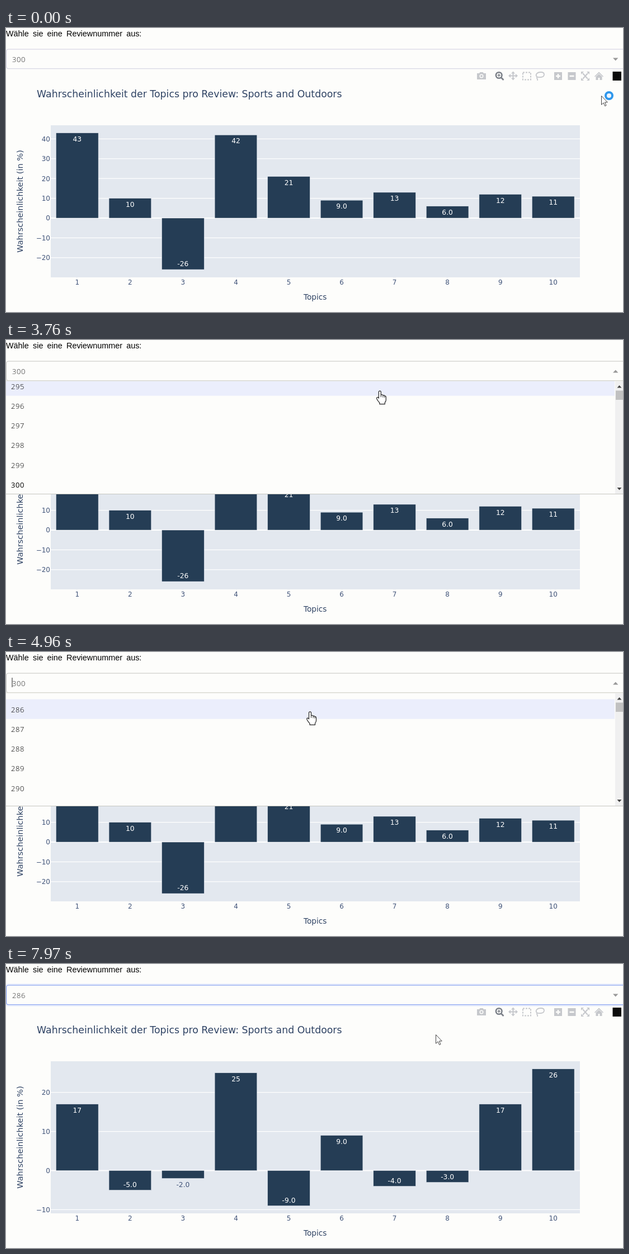
Animation of 1103x508 px, one loop 8000 ms. Source, as an HTML page with a canvas:

```html
<!DOCTYPE html>
<html lang="de">
<head>
<meta charset="utf-8">
<title>Topics pro Review</title>
<style>
html, body { margin: 0; width: 100%; height: 100%; overflow: hidden; background: #fdfdfb; }
canvas { display: block; }
</style>
</head>
<body>
<canvas id="stage" width="1103" height="508"></canvas>
<script>
const ctx = document.getElementById('stage').getContext('2d');
const LOOP = 8000, PAGE = '#fdfdfb', PLOT = '#e3e8ef', INK = '#2f4364', TICK = '#42557a', BAR = '#253d55';
const SANS = '"DejaVu Sans", sans-serif', LIST = '"Open Sans", sans-serif';
const ROW = 35.2, MENU_TOP = 73, MENU_BOTTOM = 275;
const OPEN = 2400, PICK = 6100, UPDATE = 6450;

const cursorTrack = [
  [40, 1064, 121], [170, 1073, 113], [830, 1073, 113], [1240, 1095, 61], [1540, 1091, 53],
  [3110, 1091, 53], [3800, 643, 93.5], [4830, 643, 93.5], [5150, 400, 126], [5470, 166.5, 105.5],
  [6400, 166.5, 105.5], [6870, 372, 97], [7240, 591, 131], [7790, 591, 131], [7970, 768, 126]
];
const scrollTrack = [[3880, 0], [4060, 120], [4130, 120], [4300, 232], [4340, 232], [4530, 336.8]];
const charts = [
  { values: [43, 10, -26, 42, 21, 9, 13, 6, 12, 11], zero: 340, unit: 3.54, from: -20, to: 40 },
  { values: [17, -5, -2, 25, -9, 9, -4, -3, 17, 26], zero: 369.5, unit: 6.99, from: -10, to: 20 }
];

function track(keys, t) {
  if (t <= keys[0][0]) return keys[0].slice(1);
  const i = keys.findIndex(k => k[0] > t);
  if (i < 0) return keys[keys.length - 1].slice(1);
  const a = keys[i - 1], b = keys[i], p = (t - a[0]) / (b[0] - a[0]);
  return a.slice(1).map((v, n) => v + (b[n + 1] - v) * p);
}
const clamp = v => Math.max(0, Math.min(1, v));

function rect(x, y, w, h, color) {
  ctx.fillStyle = color;
  ctx.fillRect(x, y, w, h);
}
function path(d, fill, stroke, width = 1) {
  const p = new Path2D(d);
  if (fill) { ctx.fillStyle = fill; ctx.fill(p); }
  if (stroke) { ctx.strokeStyle = stroke; ctx.lineWidth = width; ctx.stroke(p); }
}
// y is the middle of the capitals
function text(str, x, y, size, color = INK, align = 'center', family = SANS, weight = 400) {
  ctx.font = `${weight} ${size}px ${family}`;
  ctx.textAlign = align;
  ctx.fillStyle = color;
  ctx.fillText(str, x, y + size * 0.362);
}
function number(str, x, y, color, weight = 300) {
  ctx.letterSpacing = '0.6px';
  text(str, x, y, 13, color, 'left', LIST, weight);
  ctx.letterSpacing = '0px';
}

function drawHeader() {
  ctx.wordSpacing = '3.2px';
  text('Wähle sie eine Reviewnummer aus:', 0, 10, 14.4, '#000', 'left', '"Liberation Sans", Arial, sans-serif');
  ctx.wordSpacing = '0px';
}

function drawChart({ values, zero, unit, from, to }) {
  text('Wahrscheinlichkeit der Topics pro Review: Sports and Outdoors', 55, 117.3, 17.33, INK, 'left');
  rect(80, 174, 946, 272, PLOT);
  for (let v = from; v <= to; v += 10) {
    const y = zero - v * unit, h = v ? 1.2 : 2;
    rect(80, y - h / 2, 946, h, '#fff');
    text(String(v).replace('-', '−'), 79, y, 12, TICK, 'right');
  }
  values.forEach((v, i) => {
    const x = 127.3 + 94.55 * i, end = zero - v * unit, outside = Math.abs(v) * unit < 17;
    const box = [x - 37.8, Math.min(zero, end), 75.6, Math.abs(v) * unit];
    rect(...box, BAR);
    ctx.strokeStyle = PLOT;
    ctx.lineWidth = 0.5;
    ctx.strokeRect(...box);
    const label = Math.abs(v) < 10 ? v.toFixed(1) : String(v);
    text(label, x, end + (v > 0 || outside ? 10.7 : -10), 12.3, outside ? TICK : '#fff');
    text(String(i + 1), x, 454.7, 12, TICK);
  });
  text('Topics', 552.7, 481.5, 13.7);
  ctx.save();
  ctx.translate(24.5, 310);
  ctx.rotate(-Math.PI / 2);
  text('Wahrscheinlichkeit (in %)', 0, 0, 14.5);
  ctx.restore();
}

function drawModebar(alpha) {
  const gray = '#c6c8cc', active = '#7b8088';
  ctx.globalAlpha = alpha;
  path('M842 81h4l1.5-2h5l1.5 2h4v11h-16z', gray);
  path('M853.5 86a3.5 3.5 0 1 1-7 0a3.5 3.5 0 1 1 7 0z', PAGE);
  path('M852 86a2 2 0 1 1-4 0a2 2 0 1 1 4 0z', gray);
  path('M886.5 84.5a5.3 5.3 0 1 1-10.6 0a5.3 5.3 0 1 1 10.6 0zM885 88.5l4.5 4.5', null, active, 2.6);
  path('M878.5 84.5h5.4M881.2 81.8v5.4', null, active, 1.5);
  path('M900 85.5h13M906.5 79v13', null, gray, 2);
  path('M898 85.5l4-3.5v7zM915 85.5l-4-3.5v7zM906.5 77.5l-3.5 4h7zM906.5 93.5l-3.5-4h7z', gray);
  ctx.setLineDash([3, 2]);
  path('M924 79.5h14v13h-14z', null, gray, 2);
  ctx.setLineDash([]);
  path('M950 88C945 84 949 79 956 79C964 79 964 87 956 88C952 89 949 86 949 89C949 91 951 91 950 94', null, gray, 1.8);
  rect(980, 79, 14, 14, gray);
  rect(1004.5, 79, 14, 14, gray);
  path('M983 86h8M987 82v8M1007.5 86h8', null, PAGE, 2.4);
  path('M1031 81l9 10M1040 81l-9 10', null, gray, 2);
  path('M1028 78h5l-5 5zM1043 78h-5l5 5zM1028 94h5l-5-5zM1043 94h-5l5-5z', gray);
  path('M1052 86.5l8-8 8 8-1 1-7-6.5-7 6.5zM1054.5 87l5.5-5 5.5 5v6h-4v-4h-3v4h-4z', gray);
  rect(1084.5, 78, 15.5, 16, '#0b0b0b');
  ctx.globalAlpha = 1;
}

function drawSelect(t, open, hover) {
  const focused = !open && t >= 1690;
  ctx.beginPath();
  ctx.roundRect(0.5, 38, 1112, 34.8, 4);
  if (focused) {
    ctx.strokeStyle = 'rgba(60,110,255,.1)';
    ctx.lineWidth = 6;
    ctx.stroke();
  }
  ctx.fillStyle = PAGE;
  ctx.fill();
  ctx.strokeStyle = focused ? '#7795ee' : open ? '#c4c4c0' : '#d0cee0';
  ctx.lineWidth = 1.1;
  ctx.stroke();
  if (hover && !focused && !open) rect(0, 73.5, 1103, 1, 'rgba(0,0,0,.06)');
  number(t < PICK ? '300' : '286', 11, 56, '#333');
  path(open ? 'M1085 58.5h9.4l-4.7-5z' : 'M1085 53.5h9.4l-4.7 5z', hover ? '#666' : '#999');
  if (open && t < 5880 && t >= 2720 && (t - 2720) % 1060 < 530) rect(10.5, 46, 1, 17, '#222');
}

function drawMenu(scroll, selected) {
  rect(0, MENU_TOP, 1103, MENU_BOTTOM - MENU_TOP, PAGE);
  ctx.save();
  ctx.beginPath();
  ctx.rect(0, MENU_TOP, 1089, MENU_BOTTOM - MENU_TOP);
  ctx.clip();
  for (let n = 284; n <= 300; n++) {
    const top = 64.5 + scroll + (n - 295) * ROW;
    if (n === selected) rect(0, top, 1088, ROW, '#ebeefc');
    number(String(n), 9, top + 18.5, '#000', n === 300 ? 400 : 300);
  }
  ctx.restore();
  rect(1089, MENU_TOP + 1, 14, 201, '#f0f0f0');
  rect(1090, 90.5, 13, 16.5, '#c1c1c1');
  path('M1092.5 85.5h8l-4-4.5zM1092.5 264h8l-4 4.5z', '#444');
  rect(0, MENU_TOP - 0.5, 1103, 1, '#dfdfd6');
  rect(0, MENU_BOTTOM, 1103, 1, '#c6c6c0');
}

function drawCursor(x, y, hand, busy) {
  ctx.save();
  ctx.translate(x, y);
  ctx.lineJoin = 'round';
  if (hand) {
    path('M-2 13V2Q-2 0 0 0Q2 0 2 2V7Q5 5.5 5.6 8Q8 6.8 8.6 9Q11 8.5 11 11V16Q11 18.5 9 20.5V23.5H-.5V21Q-3.5 18-5.3 14.5Q-6.4 12-4.5 11.3Q-3.3 11-2 13Z', '#fff', '#222', 1.2);
    path('M2 7v4M5.6 8v3.5M8.6 9v3', null, '#222', 1);
  } else {
    path('M.5.5V16.2L4.1 12.8 6.7 18.6 9 17.6 6.5 11.9H11.3Z', '#fff', '#444', 1);
  }
  if (busy) path('M20 0a6 6 0 1 1-12 0a6 6 0 1 1 12 0z', '#eef6ff', '#2f97ec', 4);
  ctx.restore();
}

function draw(t) {
  const [x, y] = track(cursorTrack, t), [scroll] = track(scrollTrack, t);
  const open = t >= OPEN && t < PICK;
  const onSelect = y > 38 && y < MENU_TOP, onMenu = open && y >= MENU_TOP;
  const wheeling = t >= 3880 && t < 4830;
  let selected = 300;
  if (onMenu) selected = wheeling ? 295 : 295 + Math.floor((y - 64.5 - scroll) / ROW);

  rect(0, 0, 1103, 508, PAGE);
  drawHeader();
  drawChart(charts[t < UPDATE ? 0 : 1]);
  drawModebar(t < PICK ? clamp((1390 - t) / 310) : clamp((t - PICK) / 300));
  drawSelect(t, open, onSelect);
  if (open) drawMenu(scroll, selected);
  drawCursor(x, y, onSelect || (onMenu && !wheeling), t < 130);
}

const start = performance.now();
function tick() {
  draw((performance.now() - start) % LOOP);
  requestAnimationFrame(tick);
}
tick();
</script>
</body>
</html>
```
